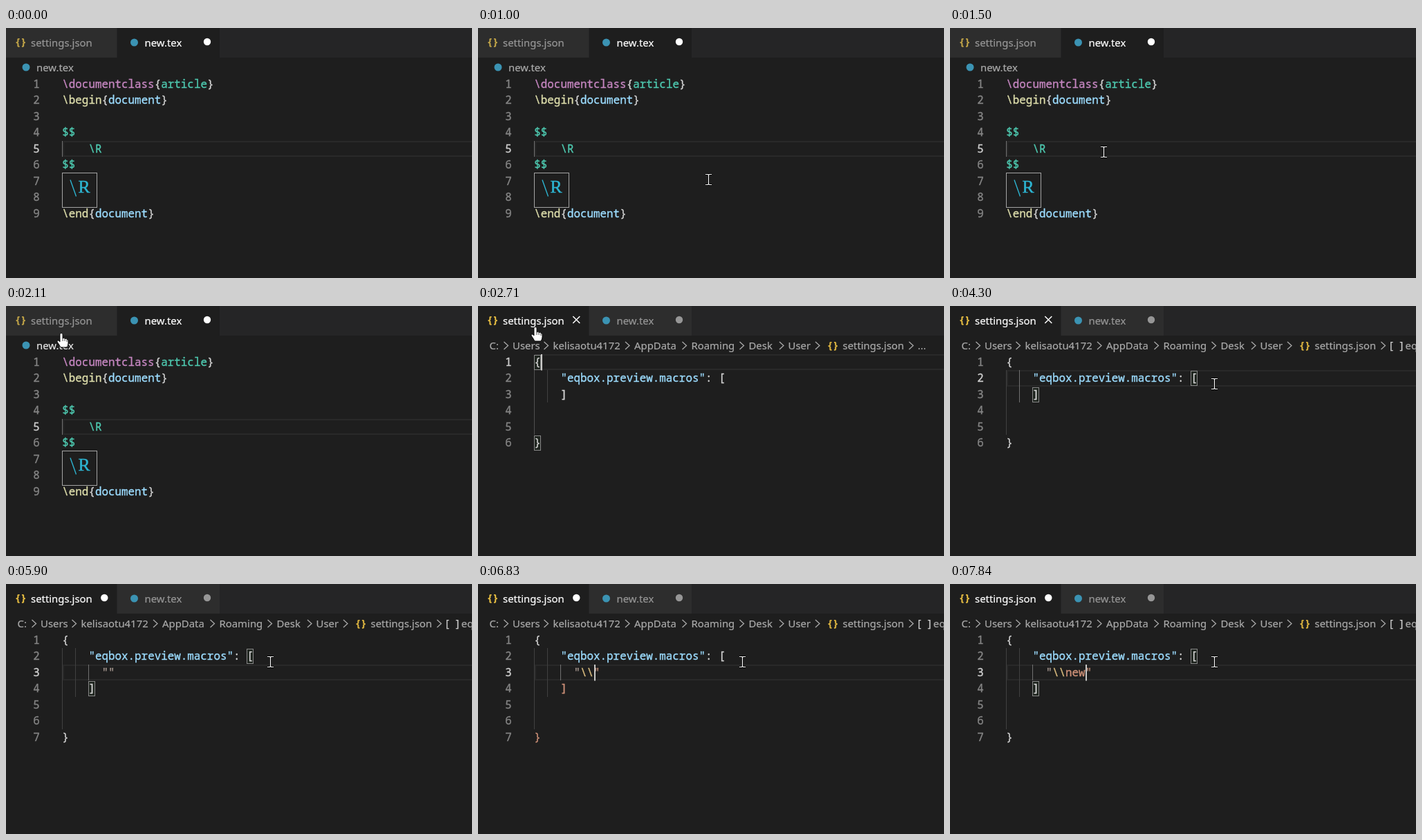
An HTML page that plays this animation: 674 px wide and 363 px high, repeating every 8 s.

```html
<!DOCTYPE html>
<html lang="en">
<head>
<meta charset="utf-8">
<title>Editor</title>
<style>
html, body { margin: 0; width: 100%; height: 100%; overflow: hidden; background: #1e1e1e; }
svg { display: block; width: 674px; height: 363px; }
text { white-space: pre; fill: currentColor; stroke: currentColor; stroke-width: .2; }
.ui { font: 14.9px "Noto Sans", "Open Sans", sans-serif; }
.code { font: 15.88px "Noto Sans Mono", "DejaVu Sans Mono", monospace; stroke-width: .35; }
.icon { font: bold 14px "Noto Sans", sans-serif; }
.math { font: 25.5px "Liberation Serif", serif; stroke-width: .5; }
</style>
</head>
<body>
<svg id="stage" viewBox="0 0 674 363"></svg>
<script>
const LOOP = 8000;
const LEFT = 81.3, ADVANCE = 9.53, TOP = 70, LINE = 23.5;
const C = {
  plain: '#d4d4d4', key: '#9cdcfe', teal: '#4ec9b0', command: '#dcdcaa', keyword: '#c586c0',
  string: '#ce9178', escape: '#d7ba7d', quote: '#a99a92', dim: '#969696', crumb: '#a9a9a9',
  mark: '#3b93b3', math: '#2db5d2', guide: '#404040', active: '#707070'
};

const OPEN_TAB = 2450, CLICK = 3770, ENTER = 4770, QUOTE = 5370;
const ESCAPE = 6690, BROKEN = 6760, SECOND = 6830, FIXED = 6900;
const CARET_OFF = [[2980, 3510], [4300, ENTER], [5300, QUOTE], [5900, 6360], [7360, 7580]];

// Pointer path: time, x, y
const PATH = [
  [650, 437, 343], [820, 388, 266], [1000, 333, 220], [1290, 217, 180], [1360, 228, 186],
  [1500, 222, 180], [1770, 150, 118], [1970, 97, 62], [2100, 80, 39], [2245, 82, 34],
  [2450, 83, 30], [2780, 83, 30], [3060, 118, 76], [3410, 258, 122], [3690, 376, 116], [3900, 382, 113]
];
// Pointer sampling: start, step
const SAMPLING = [[650, 70], [1500, 67.5], [2320, 65], [3130, 70]];

const colX = c => LEFT + c * ADVANCE;
const rowY = r => Math.floor(TOP + (r - 1) * LINE);
const within = (t, a, b) => t >= a && t < b;

const rect = (x, y, w, h, fill, extra = '') =>
  `<rect x="${x}" y="${y}" width="${w}" height="${h}" fill="${fill}" ${extra}/>`;
const dot = (x, y, r, fill) => `<circle cx="${x}" cy="${y}" r="${r}" fill="${fill}"/>`;
const stroke = (d, color, w = 1) => `<path d="${d}" fill="none" stroke="${color}" stroke-width="${w}"/>`;
const text = (cls, x, y, s, color, extra = '') =>
  `<text class="${cls}" x="${x}" y="${y}" color="${color}" ${extra}>${s}</text>`;

// Coloured runs laid out from one column: text, colour, text, colour...
function code(row, col, ...runs) {
  let out = '';
  for (let i = 0; i < runs.length; i += 2) {
    out += text('code', colX(col), rowY(row) + 17, runs[i], runs[i + 1]);
    col += runs[i].length;
  }
  return out;
}

function lineNumbers(count, current) {
  let out = '';
  for (let n = 1; n <= count; n++) {
    out += text('code', 48.8, rowY(n) + 17, n, n === current ? '#d0d0d0' : '#858585', 'text-anchor="end"');
  }
  return out;
}

const currentLine = row =>
  rect(83, rowY(row) + 1, 600, rowY(row + 1) - rowY(row) - 2, 'none', 'stroke="#292929" stroke-width="2"');
const guide = (col, from, to, color = C.guide) =>
  rect(Math.round(colX(col)), rowY(from), 1, rowY(to + 1) - rowY(from), color);
const bracketBox = (row, col) =>
  rect(Math.floor(colX(col)) + .5, rowY(row) + 1.5, 9, 21, '#1e241e', 'stroke="#888"');
const caret = (row, col) => rect(Math.round(colX(col) + .5), rowY(row), 2, LINE, '#c8c8c6');

const braces = (x, y, color) =>
  text('icon', x, y, '{', color) + text('icon', x + 8, y, '}', color);
const chevron = x => stroke(`M${x} 52l6 5.5l-6 5.5`, C.crumb, 1.3);

function tabs(t) {
  const json = t >= OPEN_TAB;
  let out = rect(0, 0, 674, 43, '#252526');
  out += rect(0, 0, 160, 43, json ? '#1e1e1e' : '#2d2d2d');
  out += rect(161, 0, 148, 43, json ? '#2d2d2d' : '#1e1e1e');
  out += braces(14.6, 25, json ? '#e6bd42' : '#c2a548');
  out += text('ui', 36, 27, 'settings.json', json ? '#fff' : C.dim);
  out += dot(185.5, 21, 5.5, C.mark);
  out += text('ui', 200.5, 27, 'new.tex', json ? C.dim : '#fff');
  out += dot(291, 20, 5.2, json ? C.dim : '#fff');
  if (t >= ENTER) out += dot(142.3, 20, 5.2, '#fff');
  else if (t >= 2180) out += stroke('M137.3 15l10 10M147.3 15l-10 10', json ? '#fff' : C.dim, 1.5);
  return out;
}

function crumbs(t) {
  if (t < OPEN_TAB) {
    const hover = within(t, 1960, 2240);
    return dot(29, 57, 5.5, C.mark) + text('ui', 44, 63, 'new.tex', hover ? '#e6e6e6' : C.crumb);
  }
  const parts = [[16.5, 'C:'], [50, 'Users'], [108.5, 'kelisaotu4172'], [226, 'AppData'],
    [308.5, 'Roaming'], [391.5, 'Desk'], [448.5, 'User'], [527.5, 'settings.json']];
  let out = parts.map(([x, s]) => text('ui', x, 63, s, C.crumb)).join('');
  out += [37.5, 95.5, 213, 295.5, 378.5, 436, 488, 623.5].map(chevron).join('');
  out += braces(506.6, 61.5, '#dcb440');
  if (t < CLICK) return out + text('ui', 636, 63, '...', C.crumb);
  return out + text('ui', 636, 62, '[', '#d0d0d0') + text('ui', 650.5, 62, ']', '#d0d0d0') +
    text('ui', 658.5, 63, 'eqbox.preview.macros', C.crumb);
}

function texFile() {
  const env = name => [name, C.command, '{', C.plain, 'document', C.key, '}', C.plain];
  return currentLine(5) + guide(0, 5, 5, C.active) + lineNumbers(9, 5) +
    code(1, 0, '\\documentclass', C.keyword, '{', C.plain, 'article', C.teal, '}', C.plain) +
    code(2, 0, ...env('\\begin')) +
    code(4, 0, '$$', C.teal) +
    code(5, 4, '\\R', C.teal) +
    code(6, 0, '$$', C.teal) +
    code(9, 0, ...env('\\end')) +
    rect(81.5, 210.5, 50, 50, '#1e1e1e', 'stroke="#a4a4a4"') +
    stroke('M93 220.5L101.5 244.5', C.math, 1.4) +
    text('math', 104.5, 239, 'R', C.math);
}

function newEntry(t) {
  if (t < QUOTE) return ['', 6];
  if (t < ESCAPE) return [code(3, 6, '""', C.quote), 7];
  if (t < SECOND) return [code(3, 6, '"', C.quote, '\\"', C.escape), 8];
  const word = 'new'.slice(0, [7580, 7710, 7840].filter(k => t >= k).length);
  return [code(3, 6, '"', C.quote, '\\\\', C.escape, word, C.string, '"', '#c08c76'), 9 + word.length];
}

function jsonFile(t) {
  const added = t >= ENTER ? 1 : 0;
  const row = t < CLICK ? 1 : 2 + added;
  const last = 6 + added;
  const broken = within(t, BROKEN, FIXED);
  const [entry, entryCol] = newEntry(t);
  const col = t < CLICK ? 1 : added ? entryCol : 29;
  const tail = broken ? C.string : C.plain;

  let out = currentLine(row);
  out += guide(0, 2, last - 1, t < CLICK ? '#505050' : C.guide);
  out += guide(2, 2, 3 + added, within(t, CLICK, QUOTE) ? C.active : C.guide);
  if (t >= QUOTE) out += guide(4, 3, 3, C.active);
  if (t < CLICK) out += bracketBox(1, 0) + bracketBox(6, 0);
  else if (!broken) out += bracketBox(2, 28) + bracketBox(3 + added, 4);

  out += lineNumbers(last, row);
  out += code(1, 0, '{', C.plain);
  out += code(2, 4, '"eqbox.preview.macros"', C.key, ': [', C.plain);
  out += entry;
  out += code(3 + added, 4, ']', tail) + code(last, 0, '}', tail);
  if (!CARET_OFF.some(([a, b]) => within(t, a, b))) out += caret(row, col);
  return out;
}

function pointerAt(t) {
  const [start, step] = SAMPLING.filter(s => t >= s[0]).pop();
  const time = start + Math.floor((t - start) / step) * step;
  const i = PATH.findIndex(p => p[0] > time);
  if (i < 0) return PATH[PATH.length - 1].slice(1);
  const [a, b] = [PATH[i - 1], PATH[i]];
  const k = (time - a[0]) / (b[0] - a[0]);
  return [a[1] + (b[1] - a[1]) * k, a[2] + (b[2] - a[2]) * k];
}

function pointer(t) {
  if (t < 650) return '';
  const [x, y] = pointerAt(t).map(Math.round);
  const beam = 'M-4 -7.5H-.5L.5 -6.5L1.5 -7.5H5M-4 7.5H-.5L.5 6.5L1.5 7.5H5M.5 -7V7';
  const hand = 'M-2 1.5Q0 -1 2 1.5V8Q4 6.5 5 8.5Q7 7.5 8 9.5Q10 9 10 11V15Q10 18 8 21' +
    'H-1Q-3 17 -6 13Q-6.5 10.5 -4 11L-2 13Z';
  const shape = y < 70
    ? `<path d="${hand}" fill="#fff" stroke="#000" stroke-width=".9"/>` + stroke('M2 8V12M5 9V12M8 10V13', '#000', .7)
    : stroke(beam, '#000', 3) + stroke(beam, '#fff', 1.2);
  return `<g transform="translate(${x} ${y})">${shape}</g>`;
}

const stage = document.getElementById('stage');
let shown = '';

function draw(t) {
  const scene = rect(0, 0, 674, 363, '#1e1e1e') + tabs(t) + crumbs(t) +
    (t < OPEN_TAB ? texFile() : jsonFile(t)) + pointer(t);
  if (scene !== shown) stage.innerHTML = shown = scene;
}

const begin = performance.now();
function tick() {
  draw((performance.now() - begin) % LOOP);
  requestAnimationFrame(tick);
}
tick();
</script>
</body>
</html>
```
